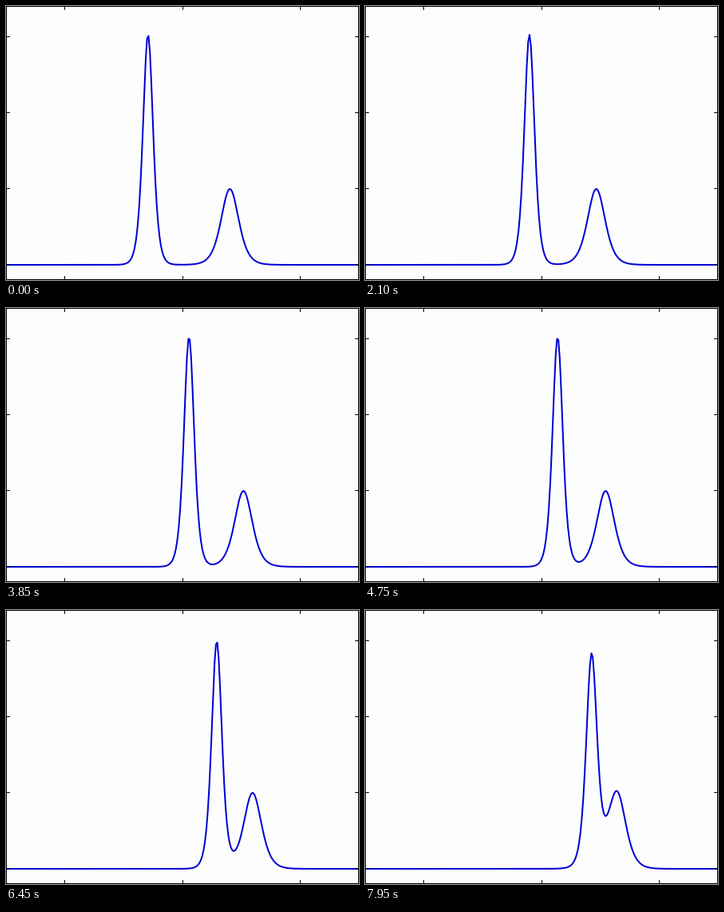
These frames come from a looping animation (442x343 px, 8 s). A matplotlib script:

```python
import numpy as np
import matplotlib.pyplot as plt
from matplotlib.animation import FuncAnimation

W, H, DPI = 442, 343, 100
FRAMES, INTERVAL = 160, 50
PX = 72 / DPI                      # one pixel in points

# Two-soliton solution of u_t + 6 u u_x + u_xxx = 0
K1, K2 = np.sqrt(3.03), 1.0        # u = 2 k^2 sech^2(k (x - 4 k^2 t))
X1, X2 = -2.973, 4.003             # centres at the start
DT = 0.003746
A = ((K1 - K2) / (K1 + K2)) ** 2

x = np.linspace(-15, 15, 257)      # coarse grid, so the peaks look faceted


def wave(t):
    e1 = np.exp(2 * K1 * (x - X1 - 4 * K1**2 * t))
    e2 = np.exp(2 * K2 * (x - X2 - 4 * K2**2 * t)) / A
    terms = np.array([np.ones_like(x), e1, e2, A * e1 * e2])
    rates = np.array([0, 2 * K1, 2 * K2, 2 * (K1 + K2)])[:, None]
    p = terms / terms.sum(axis=0)
    mean = (p * rates).sum(axis=0)
    return 2 * (p * (rates - mean) ** 2).sum(axis=0)


fig = plt.figure(figsize=(W / DPI, H / DPI), dpi=DPI, facecolor="#fefdfe")
ax = fig.add_axes([0, 0, 1, 1])
ax.set_xlim(0, W)
ax.set_ylim(H, 0)
ax.axis("off")


def stroke(xs, ys):
    ax.plot(xs, ys, color="black", lw=PX, solid_capstyle="butt",
            snap=False, zorder=3)


for y in (0.5, H - 0.5):
    stroke([0, W], [y, y])
for c in (0.5, W - 0.5):
    stroke([c, c], [0, H])
for c in (73.5, 221.5, 368.5):
    stroke([c, c], [0, 5])
    stroke([c, c], [H - 5, H])
for y in (38.5, 133.5, 228.5, 323.5):
    stroke([0, 5], [y, y])
    stroke([W - 5, W], [y, y])

curve, = ax.plot([], [], color="#0000d4", lw=2 * PX, zorder=2,
                 solid_joinstyle="round", snap=False)


def draw(i):
    curve.set_data(221.5 + 14.7 * x, 324 - 47.55 * wave(i * DT))
    return curve,


anim = FuncAnimation(fig, draw, frames=FRAMES, interval=INTERVAL,
                     repeat=True, repeat_delay=0, blit=False)
plt.show()
```
